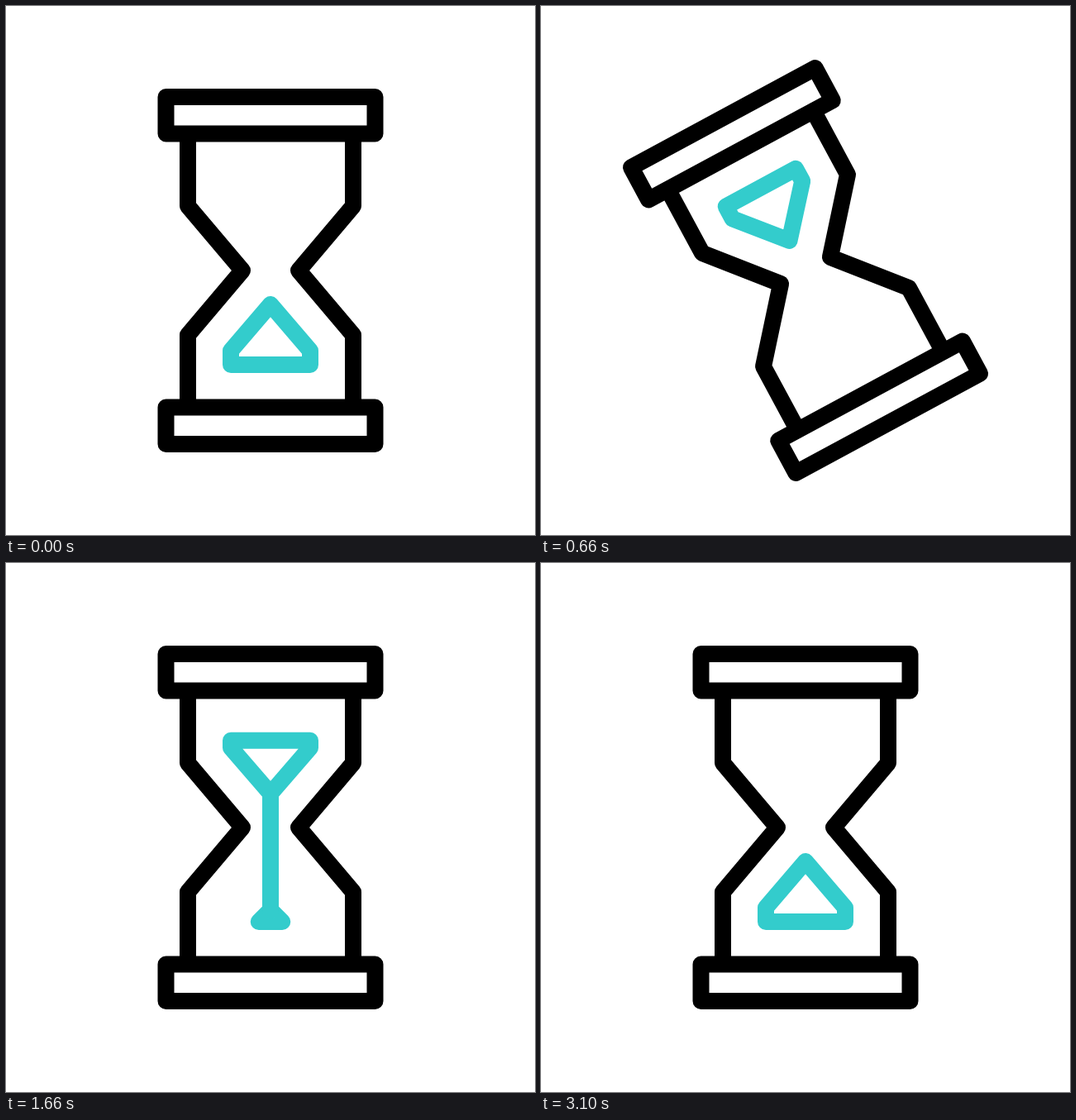
These frames come from a looping animation (640x640 px, 3600 ms). An HTML page with a canvas:

```html
<!DOCTYPE html>
<html lang="en">
<head>
<meta charset="utf-8">
<title>Hourglass</title>
<style>
  html, body { margin: 0; width: 100%; height: 100%; overflow: hidden; background: #fff; }
  canvas { display: block; width: 640px; height: 640px; }
</style>
</head>
<body>
<canvas id="stage" width="640" height="640"></canvas>
<script>
const ctx = document.getElementById('stage').getContext('2d');

const LOOP = 3600, STEP = 20;
const FLIP_END = 940, LAND = 1457, HALF = 2140, EMPTY = 2780, DONE = 3020;
const MID = 320, HALF_W = 48;
const SPOUT = 279, FLOOR = 434, PEAK = 361;
const FALL_SPEED = 0.3;

const mix = (a, b, k) => a + (b - a) * k;
const span = (t, a, b) => Math.min(1, Math.max(0, (t - a) / (b - a)));

// cubic-bezier(.5, 0, .5, 1)
function ease(x) {
  let lo = 0, hi = 1;
  for (let i = 0; i < 30; i++) {
    const s = (lo + hi) / 2;
    if (1.5 * s * (1 - s) + s * s * s < x) lo = s; else hi = s;
  }
  return lo * lo * (3 - 2 * lo);
}

function line(points, closed) {
  ctx.beginPath();
  points.forEach(([x, y]) => ctx.lineTo(x, y));
  if (closed) ctx.closePath();
  ctx.stroke();
}

function glass() {
  ctx.strokeStyle = '#000';
  for (const y of [110, 485.5]) ctx.strokeRect(193.5, y, 253, 44.5);
  for (const side of [-1, 1]) {
    const wall = [[100, 155], [100, 242], [34, 320], [100, 398], [100, 485]];
    line(wall.map(([dx, y]) => [MID + side * dx, y]));
  }
}

function heap(base, shoulder, tip, w) {
  line([[MID - w, base], [MID + w, base], [MID + w, shoulder],
        [MID, tip], [MID - w, shoulder]], true);
}

function drip(from, to, ground) {
  const a = Math.max(from, SPOUT), b = Math.min(to, ground);
  if (b > a) line([[MID, a], [MID, b]]);
}

function pour(t) {
  // upper sand sinks to its shoulders, then shrinks into the spout
  if (t < EMPTY) {
    const rim = 223.5;
    if (t < HALF) {
      heap(mix(206, rim, span(t, 1180, HALF)), rim, SPOUT, HALF_W);
    } else {
      const k = span(t, HALF, EMPTY), y = mix(rim, SPOUT, k);
      heap(y, y, SPOUT, HALF_W * (1 - k));
    }
  }

  // lower pile
  const grow = span(t, LAND, HALF), rise = span(t, HALF, DONE);
  const tip = mix(mix(FLOOR, 386, grow), PEAK, rise);
  if (grow > 0) heap(FLOOR, mix(FLOOR, 417, rise), tip, HALF_W * grow);

  // two drops run ahead of the steady stream
  const front = SPOUT + FALL_SPEED * (t - FLIP_END);
  drip(front - 4, front, tip);
  drip(front - 34, front - 25, tip);
  drip(mix(SPOUT, PEAK, span(t, EMPTY, DONE)), front - 57, tip);
}

function draw(t) {
  ctx.setTransform(1, 0, 0, 1, 0, 0);
  ctx.fillStyle = '#fff';
  ctx.fillRect(0, 0, 640, 640);
  ctx.lineWidth = 20;
  ctx.lineCap = ctx.lineJoin = 'round';

  const flipping = t < FLIP_END;
  if (flipping) {
    ctx.translate(MID, MID);
    ctx.rotate(Math.PI * ease(t / FLIP_END));
    ctx.translate(-MID, -MID);
  }
  glass();
  ctx.strokeStyle = '#33cccc';
  if (flipping || t >= DONE) heap(FLOOR, 417, PEAK, HALF_W);
  else pour(t);
}

const start = performance.now();
function tick() {
  const t = (performance.now() - start) % LOOP;
  draw(Math.floor(t / STEP) * STEP);
  requestAnimationFrame(tick);
}
tick();
</script>
</body>
</html>
```
